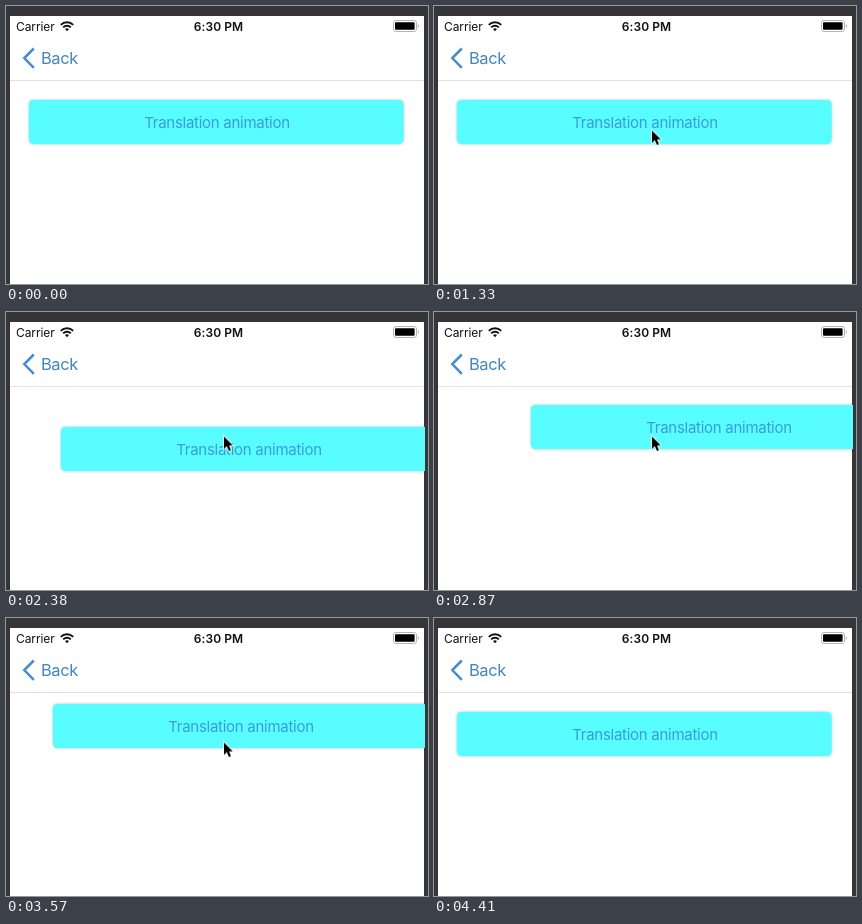
Animation of 422 by 278 pixels, one loop 4620 ms. Source, as an HTML page:

```html
<!DOCTYPE html>
<html lang="en">
<head>
<meta charset="utf-8">
<title>Translation animation</title>
<style>
  html, body { margin: 0; width: 100%; height: 100%; overflow: hidden; background: #363537; }
  svg { display: block; width: 422px; height: 278px; font-family: Inter, Roboto, sans-serif; }
  .status { font-size: 12px; letter-spacing: -.1px; fill: #111; }
  .time { font-weight: 600; letter-spacing: .1px; text-anchor: middle; }
  .back { font-size: 16.5px; letter-spacing: -.45px; fill: #4486bf; }
  .face { fill: #58feff; filter: drop-shadow(0 0 1.4px rgba(70, 130, 145, .5)); }
  .label { font-size: 15px; letter-spacing: -.27px; fill: #399bdc; text-anchor: middle; }

  #button, #cursor { animation: 4620ms ease-in-out infinite paused; }
  #button { animation-name: hop; }
  #cursor { animation-name: point; }

  /* Two hops, each followed by a slow drift, then home. */
  @keyframes hop {
    0%, 28.79% { transform: translate(0, 0); }
    34.85% { transform: translate(24px, -46px); }
    39.39% { transform: translate(27px, 15px); }
    51.52% { transform: translate(32px, 21px); }
    57.58% { transform: translate(15px, -46px); }
    62.12% { transform: translate(74px, -1px); }
    65.15% { transform: translate(57px, -19px); }
    77.27% { transform: translate(24px, -8px); }
    84.85%, 100% { transform: translate(0, 0); }
  }
  /* In from below, over to Back, onto the button, out again. */
  @keyframes point {
    0%, 4.55% { transform: translate(240px, 300px); animation-timing-function: ease-out; }
    15.15% { transform: translate(54px, 53px); }
    24.24% { transform: translate(226px, 142px); }
    28.79%, 84.85% { transform: translate(218px, 124.6px); }
    95.45%, 100% { transform: translate(222px, 300px); }
  }
</style>
</head>
<body>
<svg viewBox="0 0 422 278">
  <clipPath id="screen"><rect x="4" y="10" width="415" height="268"/></clipPath>
  <rect width="422" height="278" fill="#363537"/>
  <rect x="4" y="10" width="414" height="268" fill="#fff"/>

  <text class="status" x="10" y="25">Carrier</text>
  <g fill="none" stroke="#111" stroke-width="2">
    <path d="M54.8 18.9a8.8 8.8 0 0 1 12.4 0M57.2 21.4a5.4 5.4 0 0 1 7.6 0"/>
    <path d="M61 25.2l-2-2.1a2.9 2.9 0 0 1 4 0z" fill="#111" stroke="none"/>
  </g>
  <text class="status time" x="212.5" y="25">6:30 PM</text>
  <rect x="387.5" y="14.5" width="23" height="11" rx="2.5" fill="#fff" stroke="#b4b4b4"/>
  <rect x="389" y="16.3" width="19.6" height="7.4" rx="1" fill="#000"/>
  <path d="M411.8 18v4q1.2-.6 1.2-2t-1.2-2" fill="#b4b4b4"/>

  <path d="M27.8 42.5L18.3 52l9.5 9.8" fill="none" stroke="#468ccf" stroke-width="2.5"/>
  <text class="back" x="35" y="58">Back</text>
  <rect x="4" y="74" width="414" height="1" fill="#e2e2e2"/>

  <g clip-path="url(#screen)">
    <g id="button">
      <rect class="face" x="23" y="94" width="374.5" height="44" rx="4.5"/>
      <text class="label" x="211" y="122">Translation animation</text>
    </g>
    <path id="cursor" d="M0 0V12.2L2.8 9.6L4.9 14.3L7 13.4L5 8.8H8.8Z"
      fill="#000" stroke="#fff" stroke-width="1.6" paint-order="stroke"/>
  </g>
</svg>
<script>
  // Hold each pose for one 70 ms step, as a screen recording does.
  const LOOP = 4620, STEP = 70;
  const animations = document.getAnimations();

  function draw() {
    const time = Math.floor(performance.now() % LOOP / STEP) * STEP;
    for (const animation of animations) animation.currentTime = time;
    requestAnimationFrame(draw);
  }
  draw();
</script>
</body>
</html>
```
